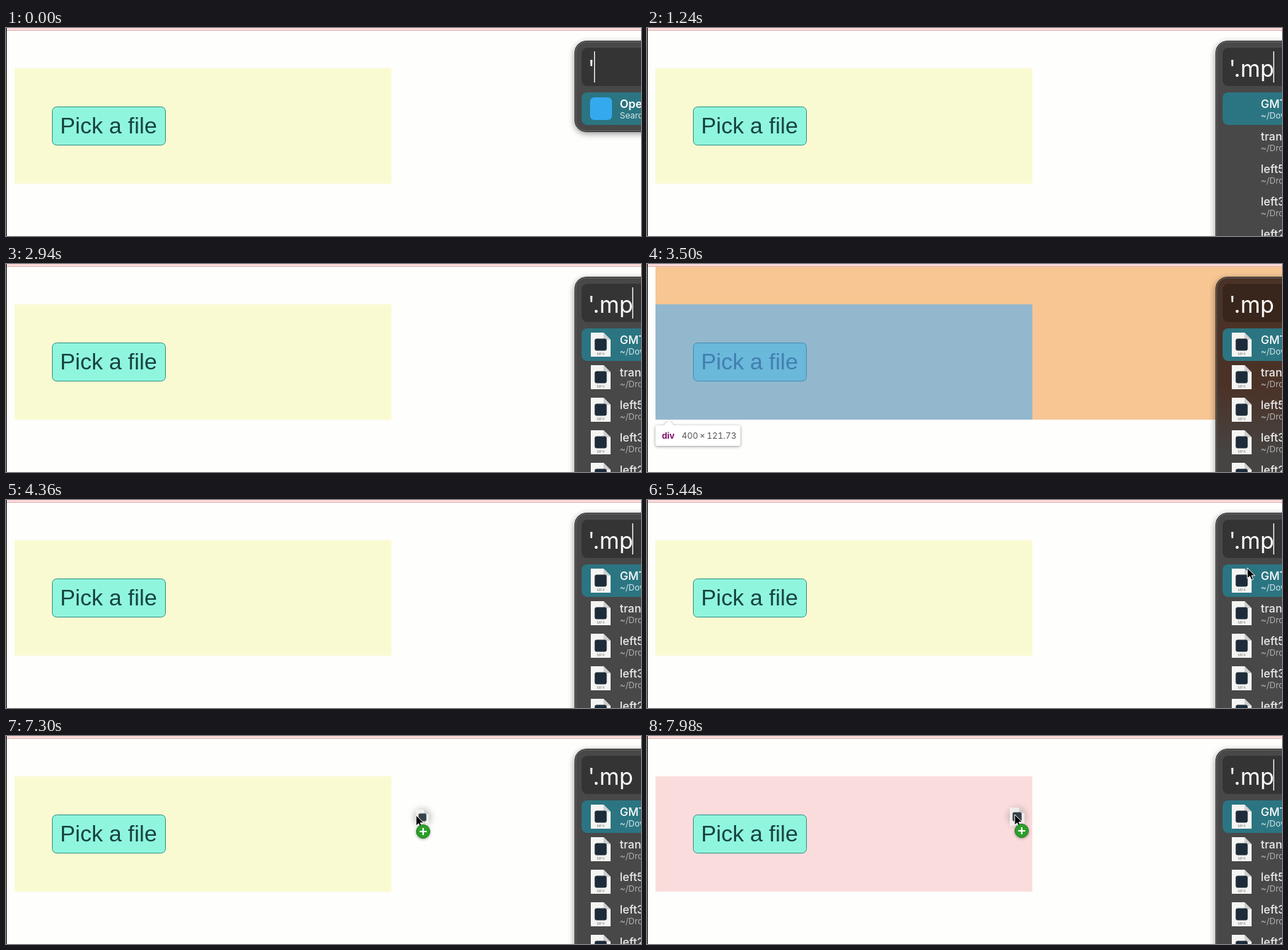
An HTML page for the animation above (8 s loop, 898x294 px).

```html
<!DOCTYPE html>
<html lang="en">
<head>
<meta charset="utf-8">
<title>Pick a file</title>
<style>
  html, body { margin: 0; width: 100%; height: 100%; overflow: hidden; background: #fefefc; }
  svg { display: block; width: 898px; height: 294px; }
  text { white-space: pre; }
  .ui { font-family: Inter, "Open Sans", sans-serif; }
  .zone { fill: #fafad2; }
  .btn { fill: #8ff6dd; stroke: #3d8f86; }
  .label { font: 32px "Liberation Sans", Arial, sans-serif; fill: #17433f; }
  .panel { fill: #484848; }
  .field { fill: #343434; }
  .query { font-size: 32px; font-weight: 400; fill: #fff; }
  .name { font-size: 16px; font-weight: 500; fill: #ececec; }
  .path { font-size: 12px; fill: #b0b0b0; }
  .active .name { fill: #fff; }
  .active .path { fill: #d3e6e8; }
  .over .zone { fill: #fbdcdc; }
  .inspect .zone { fill: #93b8ce; }
  .inspect .btn { fill: #6ab8da; stroke: #4a8fae; }
  .inspect .label { fill: #427fb0; }
  .inspect .panel { fill: url(#tinted); }
  .inspect .field { fill: #38251b; }
  .tip { font-size: 12px; font-feature-settings: "tnum"; }
</style>
</head>
<body>
<svg id="stage" viewBox="0 0 898 294" xmlns="http://www.w3.org/2000/svg">
  <defs>
    <filter id="blur" x="-50%" y="-50%" width="200%" height="200%"><feGaussianBlur stdDeviation="5"/></filter>
    <filter id="soft" x="-50%" y="-50%" width="200%" height="200%"><feGaussianBlur stdDeviation="2"/></filter>
    <linearGradient id="tinted" gradientUnits="userSpaceOnUse" x1="0" y1="170" x2="0" y2="270">
      <stop stop-color="#4b3227"/><stop offset="1" stop-color="#464442"/>
    </linearGradient>
    <g id="doc">
      <path d="M0 0H18L28 10V34H0Z" fill="#f4f4f3"/>
      <path d="M18 0V10H28Z" fill="#cfcfcf"/>
      <rect x="5.500" y="8.500" width="17" height="17" rx="3" fill="#1d2c38"/>
      <text class="ui" x="14" y="31.500" font-size="5" text-anchor="middle" fill="#858585">MP4</text>
    </g>
    <path id="arrow" d="M0 0V15L3.500 11.800L6 17.200L8.500 16L6 10.800H10.800Z"
          fill="#000" stroke="#fff" stroke-linejoin="round"/>
    <path id="bubble" d="M15 228H24L31 221L38 228H129Q132 228 132 231V254Q132 257 129 257H15Q12 257 12 254V231Q12 228 15 228Z"/>
  </defs>

  <rect width="898" height="294" fill="#fefefc"/>
  <rect id="margin" x="12" y="4" width="886" height="216" fill="#f7c693"/>
  <rect width="898" height="3" fill="#fddada"/>
  <rect y="3" width="898" height="1" fill="#deb4b0"/>
  <rect width="1" height="294" fill="#000"/>

  <rect class="zone" x="12" y="57" width="533" height="163"/>
  <rect class="btn" x="65.500" y="111.500" width="160" height="54" rx="6"/>
  <text class="label" x="76.500" y="149">Pick a file</text>

  <g id="tooltip" class="ui tip">
    <use href="#bubble" y="1" fill="#000" opacity=".4" filter="url(#soft)"/>
    <use href="#bubble" fill="#fff"/>
    <text x="21" y="247" font-weight="700" fill="#80106e">div</text>
    <text x="49" y="247" fill="#555">400&#8201;×&#8201;121.73</text>
  </g>

  <g id="launcher" class="ui">
    <rect id="glow" x="804" y="21" width="140" rx="17" opacity=".45" filter="url(#blur)"/>
    <rect class="panel" id="panel" x="804.500" y="18.500" width="140" rx="16" stroke="#222"/>
    <rect id="rim" x="805.500" y="19.500" width="140" rx="15" fill="none" stroke="#808080" stroke-opacity=".7"/>
    <rect class="field" x="814" y="28" width="120" height="54" rx="8"/>
    <rect x="814" y="91" width="120" height="46" rx="8" fill="#2b7582"/>
    <text class="query" id="query" x="823" y="69"></text>
    <rect id="caret" y="33" width="1.300" height="44" fill="#fff"/>
    <g id="opener" class="active">
      <rect x="826" y="98" width="31" height="32" rx="6" fill="#35a9ee"/>
      <text class="name" x="868" y="113" style="font-weight:600">Open File</text>
      <text class="path" x="868" y="128">Search for a file</text>
    </g>
    <g id="results"></g>
  </g>

  <g id="drag">
    <circle id="halo" r="12" fill="#000" opacity=".25" filter="url(#blur)"/>
    <use id="ghost" href="#doc" opacity=".85"/>
  </g>
  <use id="pointer" href="#arrow"/>
  <g id="badge">
    <circle cy="1" r="10" opacity=".35" filter="url(#soft)"/>
    <circle r="9.500" fill="#2b9f2a" stroke="#1d7d1c"/>
    <path d="M-5 0H5M0 -5V5" stroke="#fff" stroke-width="2.200"/>
  </g>
</svg>
<script>
const LOOP = 8000;
const $ = id => document.getElementById(id);
const show = (id, on) => $(id).setAttribute('visibility', on ? 'visible' : 'hidden');
const place = (id, x, y, scale = 1) =>
  $(id).setAttribute('transform', `translate(${x} ${y}) scale(${scale})`);

const files = [
  ['GMT2021.mp4', '~/Downloads'],
  ['transition.mp4', '~/Dropbox'],
  ['left5.mp4', '~/Dropbox'],
  ['left3.mp4', '~/Dropbox'],
  ['left2.mp4', '~/Dropbox']
];
$('results').innerHTML = files.map(([name, path], i) => `
  <g transform="translate(0 ${i * 46})" class="${i ? '' : 'active'}">
    <use class="icon" href="#doc" x="827" y="97"/>
    <text class="name" x="868" y="113">${name}</text>
    <text class="path" x="868" y="128">${path}</text>
  </g>`).join('');
const icons = [...document.querySelectorAll('.icon')];

// time, text, caret x
const typing = [[0, "'", 832], [480, "'.", 840], [840, "'.m", 867], [1020, "'.mp", 886]];
// time, pointer x, pointer y
const path = [
  [4900, 872, 300], [5200, 858, 150], [5440, 849, 96], [5800, 842, 112], [6200, 838, 114],
  [6600, 755, 113], [7000, 655, 112], [7300, 580, 112], [7980, 520, 111], [8000, 518, 111]
];
const LIST_AT = 700, ICONS_AT = 1400, DRAG_AT = 6200, OVER_AT = 7700;
const INSPECT = [3200, 4000];
const BLINK = 1267, BLINK_START = 3183;

function along(t) {
  const i = Math.max(1, path.findIndex(p => p[0] > t));
  const [a, b] = [path[i - 1], path[i]];
  const k = (t - a[0]) / (b[0] - a[0]);
  return [a[1] + (b[1] - a[1]) * k, a[2] + (b[2] - a[2]) * k];
}

function render(t) {
  const inspect = t >= INSPECT[0] && t < INSPECT[1];
  const over = t >= OVER_AT;
  const listed = t >= LIST_AT;
  $('stage').setAttribute('class', inspect ? 'inspect' : over ? 'over' : '');
  show('margin', inspect);
  show('tooltip', inspect);

  const [, text, caretX] = typing.findLast(s => s[0] <= t);
  $('query').textContent = text;
  $('caret').setAttribute('x', caretX - .3);
  show('caret', t < BLINK_START || (t - BLINK_START) % BLINK >= BLINK / 2);

  const height = listed ? 320 : 128;
  for (const [id, inset] of [['glow', 0], ['panel', 0], ['rim', 2]])
    $(id).setAttribute('height', height - inset);
  show('opener', !listed);
  show('results', listed);
  for (const icon of icons)
    icon.setAttribute('visibility', listed && t >= ICONS_AT ? 'visible' : 'hidden');

  const moving = t >= path[0][0], dragging = t >= DRAG_AT;
  show('pointer', moving);
  show('drag', dragging);
  show('badge', dragging);
  if (!moving) return;
  const [x, y] = along(t);
  place('pointer', x, y);
  if (!dragging) return;
  const settle = Math.min(1, Math.max(0, (t - 7300) / 500));
  const scale = .65 + .1 * settle;
  const cx = x + 9 - 5.5 * settle, cy = y + 3;
  place('halo', cx, cy);
  place('ghost', cx - 14 * scale, cy - 17 * scale, scale);
  place('badge', x + 10, y + 23);
}

const start = performance.now();
function tick(now) {
  render(Math.max(0, now - start) % LOOP);
  requestAnimationFrame(tick);
}
render(0);
requestAnimationFrame(tick);
</script>
</body>
</html>
```
